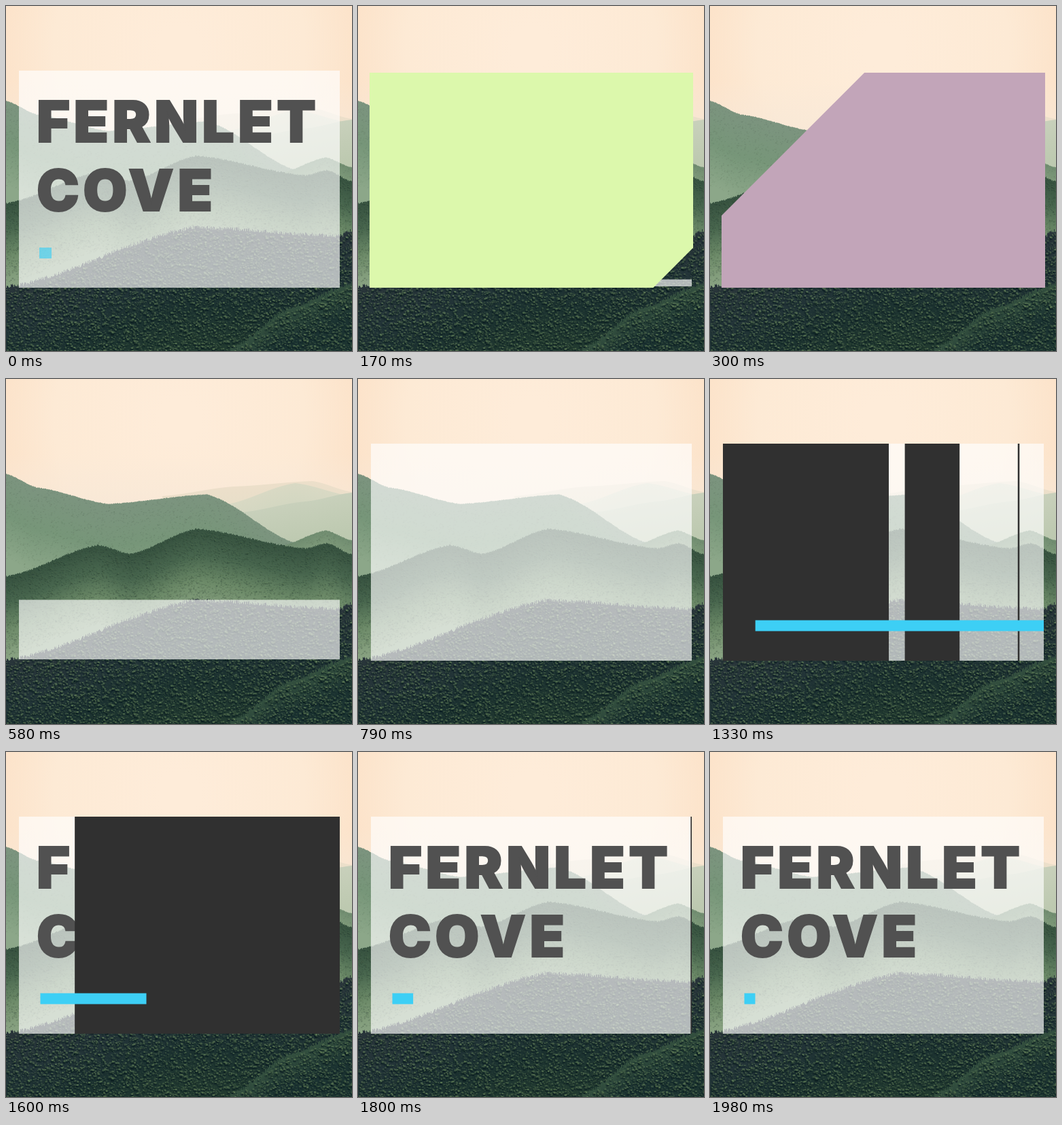
Recreate the animation shown at these times as an HTML page with a canvas. Size 509 by 507 pixels, loop 2080 ms.

```html
<!DOCTYPE html>
<html lang="en">
<head>
<meta charset="utf-8">
<title>Fernlet Cove</title>
<style>
html, body { margin: 0; width: 100%; height: 100%; overflow: hidden; background: #fdebd6; }
canvas { display: block; }
</style>
</head>
<body>
<canvas id="stage" width="509" height="507"></canvas>
<script>
const W = 509, H = 507, LOOP = 2080;
const LEFT = 19, TOP = 95, RIGHT = 491, BOTTOM = 414;
const BAR = 122;
const ctx = document.getElementById('stage').getContext('2d');

// Timing helpers
const mix = (a, b, p) => a + (b - a) * p;
const part = (t, from, to) => Math.min(1, Math.max(0, (t - from) / (to - from)));
const inOut = p => (1 - Math.cos(Math.PI * p)) / 2;
const outQuad = p => 1 - (1 - p) ** 2;
const outCubic = p => 1 - (1 - p) ** 3;

function seeded(seed) {
  return () => (seed = (seed * 16807) % 2147483647) / 2147483647;
}

// Landscape, painted once
function paintScene() {
  const canvas = document.createElement('canvas');
  canvas.width = W;
  canvas.height = H;
  const g = canvas.getContext('2d');
  const rand = seeded(71);

  function stops(gradient, colors) {
    colors.forEach((c, i) => gradient.addColorStop(i / (colors.length - 1), c));
    return gradient;
  }

  g.fillStyle = stops(g.createRadialGradient(255, 60, 30, 255, 60, 340),
    ['#feecd9', '#fdead5', '#fbdcbf']);
  g.fillRect(0, 0, W, H);
  g.fillStyle = stops(g.createLinearGradient(0, 110, 0, 185),
    ['rgba(248,233,217,0)', 'rgba(247,232,215,.8)']);
  g.fillRect(0, 110, W, 90);

  // Hill below a line of key points; shading and foliage follow its outline
  function hill(points, colors, depth, rough = 0, foliage = 0) {
    const outline = x => {
      const i = Math.max(1, points.findIndex(p => p[0] >= x));
      const [x0, y0] = points[i - 1], [x1, y1] = points[i];
      const p = part(x, x0, x1);
      return mix(y0, y1, (p + inOut(p)) / 2);
    };
    const start = points[0][0];
    g.fillStyle = stops(g.createLinearGradient(0, 0, 0, depth), colors);
    for (let x = start; x < W; x++) {
      g.setTransform(1, 0, 0, 1, x, outline(x) - rand() * rough);
      g.fillRect(0, 0, 1, H);
    }
    g.resetTransform();

    // Each leaf clump is a lit dab over its shadow
    for (let i = 0; i < foliage * (W - start); i++) {
      const x = mix(start, W - 1, rand());
      const y = outline(x) + rand() * depth;
      const size = 1 + rand() * rough * 0.4;
      const light = rand() * rough * 0.09;
      g.fillStyle = `rgba(6,24,30,${light})`;
      g.fillRect(x - 1, y + size * 0.6, size * 1.3, size);
      g.fillStyle = `rgba(125,155,105,${light * 0.85})`;
      g.fillRect(x, y, size, size * 0.8);
    }
  }

  hill([[230, 172], [335, 158], [450, 150], [509, 166]], ['#ecdfca', '#e4dec8'], 50);
  hill([[320, 185], [425, 153], [509, 172]], ['#d9d9c4', '#ced5bf'], 50);
  hill([[345, 196], [440, 180], [509, 167]], ['#c8d0bb', '#bdc9b0'], 60);
  hill([[0, 140], [45, 160], [150, 184], [295, 170], [430, 243], [509, 262]],
    ['#7c947f', '#779679', '#8ca789'], 125, 1, 10);
  hill([[400, 247], [470, 223], [509, 238]], ['#708c70', '#8aa582'], 40, 1, 4);
  hill([[0, 291], [135, 245], [182, 258], [280, 221], [440, 250], [472, 242], [509, 259]],
    ['#36513f', '#48664e', '#6c8a68', '#87a180'], 115, 2, 18);
  hill([[0, 416], [280, 328], [490, 341], [509, 333]],
    ['#29353a', '#233438', '#1c3230', '#223a30'], 175, 6, 26);
  hill([[330, 507], [420, 446], [509, 410]], ['#34503f', '#1b3231', '#1d3531'], 95, 6, 16);
  return canvas;
}

const scene = paintScene();

function box(color, left, top, right, bottom) {
  ctx.fillStyle = color;
  ctx.fillRect(left, top, right - left, bottom - top);
}

function clipped(left, top, right, bottom, draw) {
  ctx.save();
  ctx.beginPath();
  ctx.rect(left, top, right - left, bottom - top);
  ctx.clip();
  draw();
  ctx.restore();
}

// Diagonal band between the lines x + y = a and x + y = b
function band(color, a, b) {
  clipped(17, 98, 493, 414, () => {
    ctx.beginPath();
    ctx.moveTo(a, 0);
    ctx.lineTo(b, 0);
    ctx.lineTo(0, b);
    ctx.lineTo(0, a);
    ctx.fillStyle = color;
    ctx.fill();
  });
}

function drawTitle() {
  ctx.font = '900 84px Inter, sans-serif';
  ctx.letterSpacing = '5.5px';
  ctx.lineWidth = 2;
  ctx.fillStyle = ctx.strokeStyle = '#515151';
  [['FERNLET', 200], ['COVE', 301]].forEach(([word, y]) => {
    ctx.fillText(word, 45, y);
    ctx.strokeText(word, 45, y);
  });
}

function drawPanel(t) {
  const shown = t < 300 ? 1 - part(t, 20, 175) : inOut(part(t, 500, 730));
  const base = shown < 1 ? BOTTOM - 2 : BOTTOM;
  const edge = mix(base, TOP, shown);
  box('rgba(255,255,255,.66)', LEFT, edge, RIGHT, base);
  clipped(LEFT, edge, RIGHT, base, () => {
    if (t < 200 || t >= 1520) drawTitle();
    if (t < 200) box('rgba(61,207,245,.65)', 49, 355, 67, 371);
  });
}

function drawWipe(t) {
  const line = p => mix(115, 907, p);
  const seam = line(part(t, 172, 290));
  band('#dcf8ac', seam, line(part(t, 20, 182)));
  band('#c2a5b9', line(outQuad(part(t, 270, 480))), seam);
}

// Bars fly in from the right, widen and pile up; the full block then leaves rightwards
function drawBlock(t) {
  if (t >= 1520) {
    box('#303030', mix(LEFT, RIGHT, inOut(part(t, 1520, 1812))), TOP, RIGHT, BOTTOM);
    return;
  }
  for (let i = 0; i < 4; i++) {
    const p = part(t, 780 + i * 150, 1060 + i * 150);
    const x = mix(RIGHT, LEFT + i * BAR, p);
    box('#303030', x, TOP, Math.min(RIGHT, x + BAR * p ** 3.8), BOTTOM);
  }
}

function drawUnderline(t) {
  if (t < 1040) return;
  const left = mix(RIGHT, 50.5, outQuad(part(t, 1040, 1400)));
  const right = mix(RIGHT, 66.5, outCubic(part(t, 1430, 1980)));
  box('#3dcff5', left, 354.5, right, 370.5);
}

function frame(now) {
  let t = now % LOOP;
  if (t < 20) t = 0;
  // Short rests in the motion
  for (const rest of [170, 300, 1600]) if (t > rest && t < rest + 50) t = rest;
  ctx.drawImage(scene, 0, 0);
  drawPanel(t);
  drawBlock(t);
  drawUnderline(t);
  drawWipe(t);
  requestAnimationFrame(frame);
}
requestAnimationFrame(frame);
</script>
</body>
</html>
```
